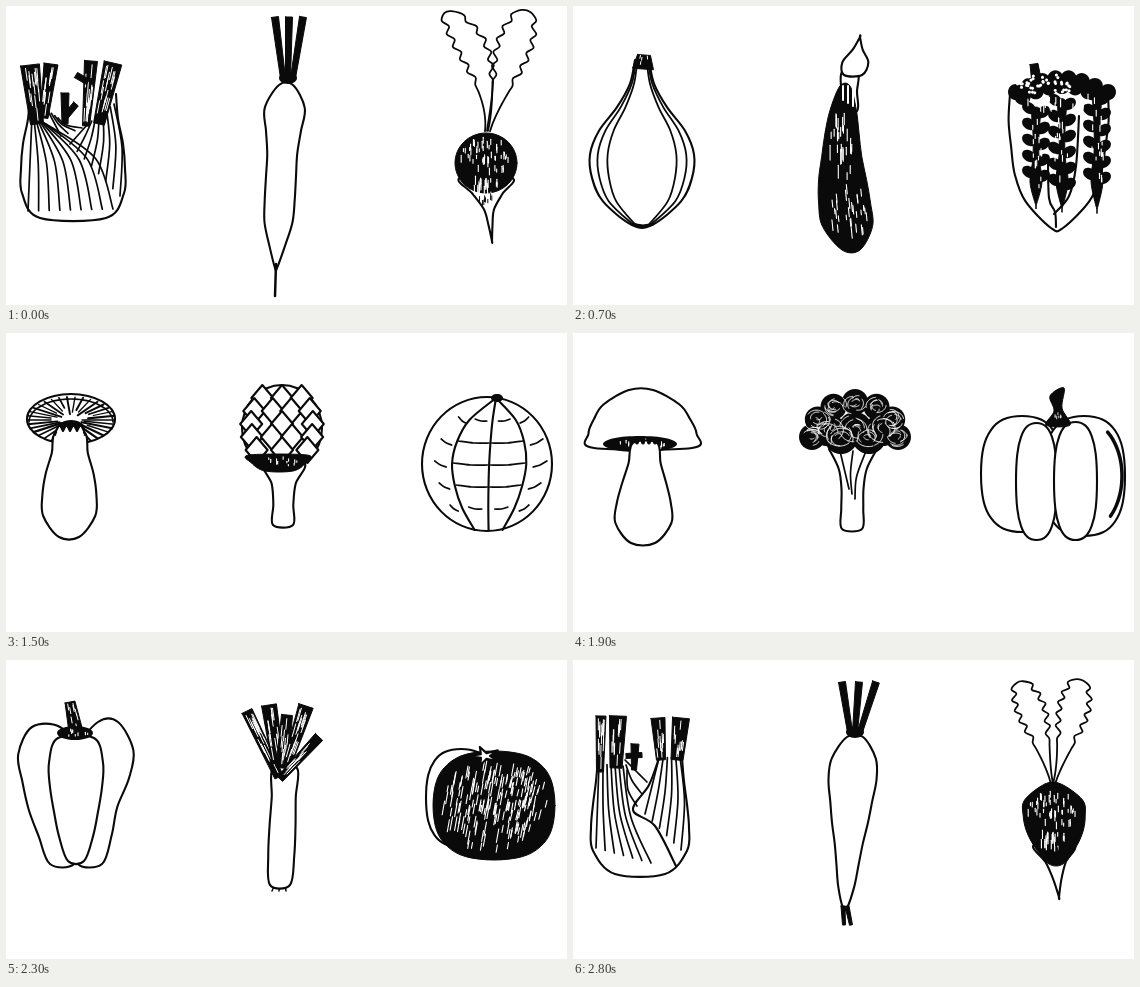
An HTML page with a canvas that plays this animation: 561 px wide and 299 px high, repeating every 2900 ms.

```html
<!DOCTYPE html>
<html>
<head>
<meta charset="utf-8">
<style>
html, body { margin: 0; width: 100%; height: 100%; overflow: hidden; background: #fff; }
canvas { display: block; }
</style>
</head>
<body>
<canvas id="stage" width="561" height="299"></canvas>
<script>
const ctx = document.getElementById('stage').getContext('2d');
const INK = '#0a0a0a', WHITE = '#fff', PEN = 2.1;
const { PI, sin, cos, hypot, min, max, abs, sign } = Math;
let fit = { sx: 1, sy: 1, dx: 0, dy: 0 }, box, seed = 1;

const random = () => (seed = seed * 16807 % 2147483647) / 2147483647;
const lerp = (a, b, u) => a + (b - a) * u;
const mix = (p, q, u) => [lerp(p[0], q[0], u), lerp(p[1], q[1], u)];
const times = (n, draw) => { for (let i = 0; i < n; i++) draw(i, n > 1 ? i / (n - 1) : 0); };
const list = (n, make) => Array.from({ length: n }, (_, i) => make(i, i / (n - 1)));

// Every shape passes through here: it is measured, fitted and smoothed.
function trace(points, closed = false, smooth = true) {
  for (const [x, y] of points) box = [min(box[0], x), min(box[1], y), max(box[2], x), max(box[3], y)];
  const p = points.map(([x, y]) => [x * fit.sx + fit.dx, y * fit.sy + fit.dy]), n = p.length;
  const at = i => closed ? p[(i + n) % n] : p[max(0, min(n - 1, i))];
  ctx.beginPath();
  ctx.moveTo(...p[0]);
  for (let i = 0; i < n - !closed; i++) {
    const [a, b, c, d] = [at(i - 1), at(i), at(i + 1), at(i + 2)];
    if (smooth) ctx.bezierCurveTo(b[0] + (c[0] - a[0]) / 6, b[1] + (c[1] - a[1]) / 6,
      c[0] - (d[0] - b[0]) / 6, c[1] - (d[1] - b[1]) / 6, ...c);
    else ctx.lineTo(...c);
  }
  if (closed) ctx.closePath();
}
function ink(width = PEN, color = INK) { ctx.lineWidth = width; ctx.strokeStyle = color; ctx.stroke(); }
function paint(color) { ctx.fillStyle = color; ctx.fill(); }

function line(points, width) { trace(points); ink(width); }
function shape(points, smooth) { trace(points, true, smooth); paint(WHITE); ink(); }
function cup(points) { trace(points); paint(WHITE); ink(); }
function solid(points, smooth) { trace(points, true, smooth); paint(INK); ink(1); }
function segment(x, y, x2, y2, width, color) { trace([[x, y], [x2, y2]], false, false); ink(width, color); }
function dot(x, y, rx, ry = rx, color = INK, tilt = 0) {
  trace(ring(0, 0, rx, ry).map(([a, b]) => [x + a * cos(tilt) - b * sin(tilt), y + a * sin(tilt) + b * cos(tilt)]), true);
  paint(color);
}

// Outline generators
function ring(x, y, rx, ry, from = 0, to = 2 * PI * 15 / 16, square = 1) {
  const bend = v => sign(v) * abs(v) ** square;
  return list(16, (i, u) => [x + rx * bend(cos(lerp(from, to, u))), y + ry * bend(sin(lerp(from, to, u)))]);
}
const lobe = (x0, x1, y0, y1) => ring((x0 + x1) / 2, (y0 + y1) / 2, (x1 - x0) / 2, (y1 - y0) / 2, undefined, undefined, .8);
// Half widths evenly spaced along an axis; side k runs from -1 (left) to 1 (right).
const pod = ([x0, y0, x1, y1, bend = 0], ...halves) => k => halves.map((h, i) => {
  const u = i / (halves.length - 1);
  return [lerp(x0, x1, u) + bend * sin(PI * u) + k * h, lerp(y0, y1, u)];
});
const rim = side => [...side(-1), ...side(1).reverse()];
const diamond = (x, y, w, h) => [[x, y - h], [x + w, y], [x, y + h], [x - w, y]];

// Texture
function flecks(x, y, rx, ry, count, length, width = 1.1, lean = 0, color = WHITE) {
  times(count, () => {
    const a = random() * 2 * PI, r = random() ** .5, l = length * (.4 + random() * .6);
    const px = x + rx * r * cos(a), py = y + ry * r * sin(a);
    segment(px + lean * l / 2, py - l / 2, px - lean * l / 2, py + l / 2, width, color);
  });
}
function stalk(x0, y0, x1, y1, w0, w1 = w0) {
  const length = hypot(x1 - x0, y1 - y0), nx = (y1 - y0) / length, ny = (x0 - x1) / length;
  const at = (u, k) => [lerp(x0, x1, u) + nx * k * lerp(w0, w1, u), lerp(y0, y1, u) + ny * k * lerp(w0, w1, u)];
  solid([at(0, -.5), at(0, .5), at(1, .5), at(1, -.5)], false);
  if (w0 > 9) times(length / 4, () => {
    const u = .05 + random() * .7, k = (random() - .5) * .7;
    segment(...at(u, k), ...at(u + .2, k), 1, WHITE);
  });
}
function fan(count, a, b, c, d, sag) {
  times(count, (i, u) => {
    const from = mix(a, b, u), to = mix(c, d, u), mid = mix(from, to, .5);
    line([from, [mid[0] + sag * u, mid[1] - sag * u / 2], to], 1.7);
  });
}
function lobedLeaf(base, bend, tip, width) {
  const edge = side => list(19, (i, u) => {
    const [x, y] = mix(mix(base, bend, u), mix(bend, tip, u), u);
    const half = width * sin(PI * .86 * u ** 1.6) + (u > .4 ? 2.5 * (i % 2 * 2 - 1) : 1);
    return [x + side * half, y + side * half * .25 * sign(tip[0] - base[0])];
  });
  line([...edge(-1), ...edge(1).reverse()], 1.8);
}

// Plants shared by the ends of the loop
function fennel(body, left, right) {
  cup(rim(body).slice().reverse().reverse());
  fan(...left);
  fan(...right);
}
function carrot(body, top, spread) {
  shape(rim(body));
  times(3, i => stalk(top[0] + (i - 1) * spread, top[1], 282 + (i - 1) * 5, 72, 7, 5));
  dot(282, 72, 9, 6);
}
function beet(bulb, cone) {
  shape(rim(cone));
  solid(bulb);
  flecks(480, 152, 25, 20, 50, 7);
  flecks(480, 180, 14, 9, 26, 9);
  flecks(480, 194, 7, 5, 9, 6, 1, 0, INK);
}
function gills(x, y, rx, ry) {
  times(34, i => {
    const a = i * PI / 17, r = .25 + .3 * random();
    segment(x + rx * cos(a), y + ry * sin(a), x + rx * r * cos(a), y + ry * r * sin(a), 1.2 + random(), INK);
  });
}
function frond(x, top, end) {
  for (let y = top; y < end - 26; y += 16) for (const side of [-1, 1])
    dot(x + side * 7, y + side * 2, 7.5, 5.5, INK, side * -.6);
  solid(rim(pod([x, top, x, end], 4, 3, 3, 6, 0)));
  flecks(x, (top + end) / 2, 7, 45, 14, 7);
}

const roots = [
  () => {
    fennel(pod([67, 88, 67, 212], 43, 45, 50, 52, 51, 33),
      [9, [26, 110], [40, 118], [22, 205], [107, 203], 16], [8, [82, 118], [108, 98], [64, 138], [114, 190], 5]);
    fan(4, [42, 105], [52, 112], [55, 130], [76, 122], -4);
    stalk(24, 59, 31, 118, 19, 13);
    stalk(45, 58, 38, 112, 14, 8);
    stalk(85, 55, 80, 120, 13, 7);
    stalk(107, 57, 93, 118, 18, 11);
    stalk(59, 87, 59, 118, 8, 6);
    stalk(70, 98, 60, 110, 6);
    stalk(70, 69, 82, 76, 6);
  },
  () => {
    const layer = pod([69, 54, 69, 219], 7, 12, 25, 43, 52, 50, 39, 10);
    cup(rim(layer));
    for (const k of [.85, .66]) { line(layer(k), 1.8); line(layer(-k), 1.8); }
    stalk(71, 49, 70, 63, 13, 21);
    line([[60, 218], [70, 220], [80, 218]], 3);
  },
  () => {
    shape(rim(pod([67, 40, 68, 209], 6, 6, 8, 17, 37, 60, 55, 30)));
    solid(rim(pod([70, 193, 70, 209], 10, 20, 27)));
    flecks(70, 204, 20, 3, 9, 3);
    times(4, i => line([[53 + 9 * i, 210], [51 + 11 * i, 228], [44 + 16 * i, 245]]));
  },
  () => {
    shape(ring(65, 86, 44, 25));
    gills(65, 87, 44, 23);
    line(ring(65, 89, 42, 23, PI, 2 * PI), 1.6);
    dot(65, 96, 14, 9);
    shape(rim(pod([64, 99, 63, 204], 14, 18, 24, 27, 26, 10)));
    shape([...list(9, (i, u) => [50 + 28 * u, i % 2 ? 91 : 98]), [78, 102], [50, 102]], false);
    segment(52, 102, 76, 102, 4, WHITE);
  },
  () => {
    shape(rim(pod([68, 57, 70, 115], 12, 38, 48, 54, 49)));
    dot(67, 111, 37, 8);
    flecks(67, 112, 30, 5, 18, 5);
    shape(rim(pod([72, 110, 70, 210], 12, 16, 22, 27, 28, 12)));
    times(4, i => dot(64 + 6 * i, 109, 2, 2.5));
  },
  () => {
    shape(rim(pod([40, 67, 56, 204], 14, 31, 30, 27, 20, 12)));
    shape(rim(pod([102, 62, 84, 204], 10, 29, 28, 20, 18, 12)));
    shape(rim(pod([70, 78, 70, 201], 18, 27, 26, 22, 17, 8)));
    stalk(64, 42, 70, 72, 10, 14);
    dot(69, 73, 18, 7);
    flecks(69, 73, 13, 4, 9, 3);
  },
  () => {
    fennel(pod([67, 98, 67, 214], 42, 44, 47, 49, 47, 25),
      [7, [26, 104], [50, 106], [23, 188], [78, 203], -6], [6, [86, 98], [107, 97], [72, 154], [108, 190], 4]);
    line([[86, 98], [76, 125], [60, 150], [82, 166], [103, 206]]);
    fan(3, [52, 100], [54, 110], [74, 122], [64, 146], -4);
    stalk(28, 56, 27, 112, 10, 7);
    stalk(45, 56, 43, 108, 17, 12);
    stalk(85, 58, 88, 100, 14, 9);
    stalk(108, 58, 104, 100, 17, 12);
    stalk(62, 84, 61, 110, 8, 5);
    stalk(53, 96, 69, 95, 5);
  }
];

const stalks = [
  () => {
    carrot(pod([280, 79, 270, 262], 7, 20, 17.5, 15, 15, 15, 14, 8, 1), [283, 11], 14);
    line([[270, 258], [269, 290]], 2.5);
  },
  () => {
    shape(rim(pod([277, 66, 275, 105], 8, 8, 9)));
    shape(rim(pod([287, 31, 280, 69], 0, 5, 13, 9)));
    solid(rim(pod([272, 80, 278, 244, -6], 5, 13, 17, 20, 24, 26, 25, 9)));
    times(3, i => segment(270 + 5 * i, 80, 270 + 5 * i, 94 + i * 3, 2, WHITE));
    flecks(269, 145, 12, 40, 28, 15);
    flecks(276, 208, 20, 28, 30, 11, 1.1, -.1);
  },
  () => {
    shape(rim(pod([276, 140, 281, 188], 12, 11, 12)), false);
    shape(rim(pod([283, 50, 278, 138], 0, 22, 35, 41, 42, 38, 22)));
    for (const i of [-2, 2, -1, 1, 0]) shape(diamond(274 + i * 15, 140 - 3 * i * i, 11, 9), false);
  },
  () => {
    shape(rim(pod([278, 130, 277, 192], 20, 12, 10, 10)));
    shape(ring(276, 95, 40, 43));
    times(5, row => {
      const y = 65 + 13 * row, reach = 40 * (1 - ((y - 95) / 43) ** 2) ** .5 - 9, count = 3 + row % 2;
      times(count, (i, u) => shape(diamond(276 + reach * (2 * u - 1), y, 11, 13), false));
    });
    solid(rim(pod([272, 122, 273, 138], 29, 27, 14)));
    flecks(273, 129, 22, 5, 13, 3);
  },
  () => {
    cup(rim(pod([280, 116, 279, 196], 24, 14, 11, 11, 10)));
    fan(3, [267, 118], [293, 118], [276, 156], [282, 166], -4);
    const heads = [...list(7, (i, u) => [282 + 43 * cos(PI * u), 104 - 35 * sin(PI * u), 13]),
      ...list(5, i => [254 + 14 * i, 96 + 8 * (i % 2), 17])];
    for (const [x, y, r] of heads) dot(x, y, r);
    for (const [x, y, r] of heads) times(10, () => {
      const a = random() * 2 * PI, q = r * (.25 + random() * .6);
      trace(ring(x + random() * 6 - 3, y + random() * 6 - 3, q, q * .85, a, a + 1 + random()));
      ink(.9, WHITE);
    });
  },
  () => {
    times(3, i => segment(269 + 5 * i, 224, 266 + 7 * i, 231, 1.5));
    shape(rim(pod([279, 108, 274, 225], 12, 12, 13, 13, 10)));
    stalk(241, 51, 273, 117, 11, 9);
    stalk(263, 45, 272, 103, 15, 12);
    stalk(281, 55, 276, 108, 11, 12);
    stalk(300, 46, 280, 108, 15, 8);
    stalk(313, 77, 274, 119, 10, 7);
  },
  () => {
    carrot(pod([282, 77, 272, 248], 8, 22, 24, 21, 18, 14, 11, 8, 2), [286, 22], 17);
    times(2, i => stalk(270 + 4 * i, 246, 271 + 7 * i, 265, 4, 3));
  }
];

const rounds = [
  () => {
    lobedLeaf([480, 125], [488, 60], [442, 6], 14);
    lobedLeaf([483, 125], [500, 62], [520, 5], 16);
    beet(ring(480, 157, 31, 30), pod([480, 172, 486, 235], 26, 15, 5, 2, 0));
  },
  () => {
    cup(rim(pod([486, 88, 484, 222], 49, 50, 47, 43, 32, 6)));
    line([[475, 150], [476, 192], [482, 206], [483, 221]]);
    line([[506, 110], [503, 160], [496, 190], [481, 208]]);
    frond(463, 104, 200);
    frond(489, 96, 203);
    frond(524, 90, 204);
    times(15, (i, u) => dot(443 + 92 * u, 86 - 14 * sin(PI * u) + 8 * (i % 2), 8, 8));
    stalk(461, 58, 464, 78, 8, 10);
    times(42, () => dot(444 + random() * 54, 69 + random() * 18, 1.5, 1.5, WHITE));
    dot(507, 99, 4, 9, WHITE);
    flecks(490, 98, 38, 9, 16, 8);
  },
  () => {
    const cob = pod([488, 15, 486, 195], 3, 21, 28, 33, 35, 36, 37, 22, 4);
    solid(rim(cob));
    for (let y = 27; y < 172; y += 6.8) {
      const half = 36 * (1 - (max(0, 150 - y) / 137) ** 2) ** .5, cell = half / 5;
      for (let c = -4.5; c < 5; c++) dot(487 + c * cell, y + abs(c) * .5 + random(), cell * .42, 2.8, WHITE);
    }
    cup([[449, 146], [452, 205], [464, 238], [480, 243], [480, 200]]);
    solid([[447, 142], [470, 162], [497, 167], [482, 202], [456, 170]]);
    shape([[522, 148], [490, 187], [475, 222], [480, 242], [508, 237], [522, 185]]);
  },
  () => {
    shape(ring(481, 131, 65, 67));
    const half = pod([490, 65, 484, 197], 0, 40, 58, 64, 58, 45, 24), seams = [-1, -.64, -.06, .52, .95];
    for (const k of seams.slice(1, 4)) line(half(k));
    dot(491, 65, 6, 4);
    times(5, row => times(4, c => {
      const short = row % 4 === 0 || c % 3 === 0 ? .25 : .04;
      const a = half(seams[c])[row + 1], b = half(seams[c + 1])[row + 1], tilt = (1.5 - c) * 2;
      const [x, y] = mix(a, b, short), [x2, y2] = mix(a, b, 1 - short);
      line([[x, y - tilt], [(x + x2) / 2, y + 1], [x2, y2 + tilt]], 1.7);
    }));
  },
  () => {
    shape(lobe(408, 490, 83, 199));
    shape(lobe(470, 552, 83, 203));
    line(ring(511, 143, 38, 56, -.9, .8), 3.5);
    shape(lobe(443, 484, 90, 207));
    shape(lobe(481, 524, 89, 207));
    solid([[473, 92], [481, 78], [477, 63], [491, 55], [489, 75], [497, 92]]);
    flecks(484, 84, 5, 4, 7, 3, .8);
  },
  () => {
    shape(lobe(420, 490, 89, 187));
    solid(lobe(427, 549, 91, 200));
    flecks(485, 146, 48, 44, 150, 14, 1.1, .18);
    flecks(517, 140, 24, 36, 40, 11, 1.1, .25);
    shape(list(10, i => {
      const r = i % 2 ? 5 : 16, a = i * PI / 5 - 1.9;
      return [479 + r * cos(a), 96 + r * .6 * sin(a)];
    }), false);
  },
  () => {
    lobedLeaf([479, 124], [466, 65], [447, 22], 13);
    lobedLeaf([481, 124], [498, 65], [507, 20], 14);
    beet(rim(pod([480, 124, 483, 204], 8, 29, 31, 28, 20, 7)), pod([481, 185, 486, 237], 20, 10, 4, 0));
  }
];

const LOOP = 2900, STEP = 100, KEYS = [0, 700, 1100, 1500, 1900, 2300, 2800];

function render(draw) {
  seed = 77;
  box = [999, 999, 0, 0];
  draw();
  return box;
}

// Each drawing reshapes toward the next one, swapping halfway.
function drawSeries(series, boxes, time) {
  const i = KEYS.findLastIndex(key => key <= time), next = (i + 1) % KEYS.length;
  const u = (time - KEYS[i]) / ((KEYS[next] || LOOP) - KEYS[i]);
  const shown = u < .5 ? i : next, own = boxes[shown];
  const goal = boxes[i].map((v, k) => lerp(v, boxes[next][k], u));
  const sx = (goal[2] - goal[0]) / (own[2] - own[0]), sy = (goal[3] - goal[1]) / (own[3] - own[1]);
  fit = { sx, sy, dx: goal[0] - own[0] * sx, dy: goal[1] - own[1] * sy };
  render(series[shown]);
}

const columns = [roots, stalks, rounds].map(series => ({ series, boxes: series.map(render) }));
ctx.lineCap = ctx.lineJoin = 'round';

function frame() {
  const time = Math.floor(performance.now() % LOOP / STEP) * STEP;
  ctx.fillStyle = WHITE;
  ctx.fillRect(0, 0, 561, 299);
  for (const { series, boxes } of columns) drawSeries(series, boxes, time);
  requestAnimationFrame(frame);
}
frame();
</script>
</body>
</html>
```
